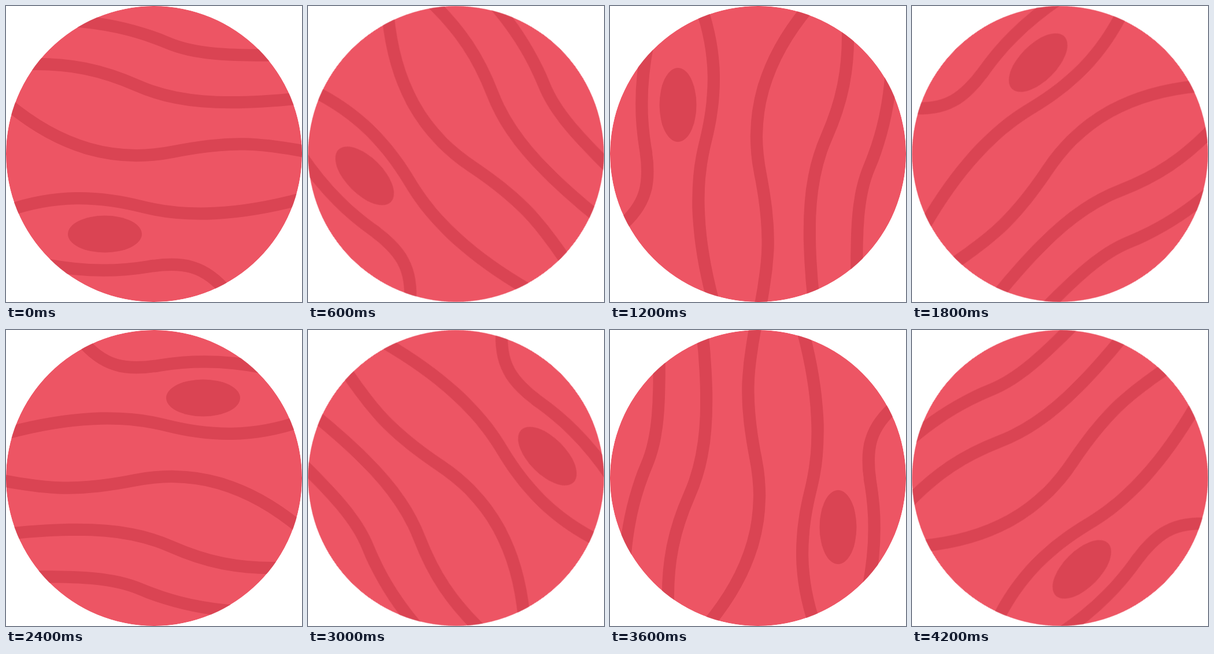
Write an HTML page that moves like this. It is 512x512 px and loops after 4.8 s.

```html
<!DOCTYPE html>
<html lang="en">
<head>
<meta charset="utf-8">
<title>Turning planet</title>
<style>
  html, body { margin: 0; width: 100%; height: 100%; overflow: hidden; background: #fff; }
  svg { display: block; width: 100vw; height: 100vh; }
  .planet {
    transform-origin: 256px 256px;
    animation: turn 4.8s steps(8, end) infinite;
  }
  .bands { fill: none; stroke: #da4453; stroke-width: 21.3; }
  @keyframes turn { to { transform: rotate(360deg); } }
</style>
</head>
<body>
<svg viewBox="0 0 512 512">
  <clipPath id="disc"><circle cx="256" cy="256" r="256"/></clipPath>
  <g class="planet" clip-path="url(#disc)">
    <circle cx="256" cy="256" r="256" fill="#ed5564"/>
    <g class="bands">
      <path d="M120 26C185 31 235 45 280 64S380 86 470 85"/>
      <path d="M40 100.5C110 99 165 110 228 138S370 174 505 160"/>
      <path d="M0 167C95 247 190 272 290 252S440 237 520 252"/>
      <path d="M0 355C85 325 160 328 235 347S400 364 520 331"/>
      <path d="M70 447.5C130 459 185 461 245 451S344 448 384 497"/>
    </g>
    <ellipse cx="171" cy="394.5" rx="64" ry="32" fill="#da4453"/>
  </g>
</svg>
</body>
</html>
```
